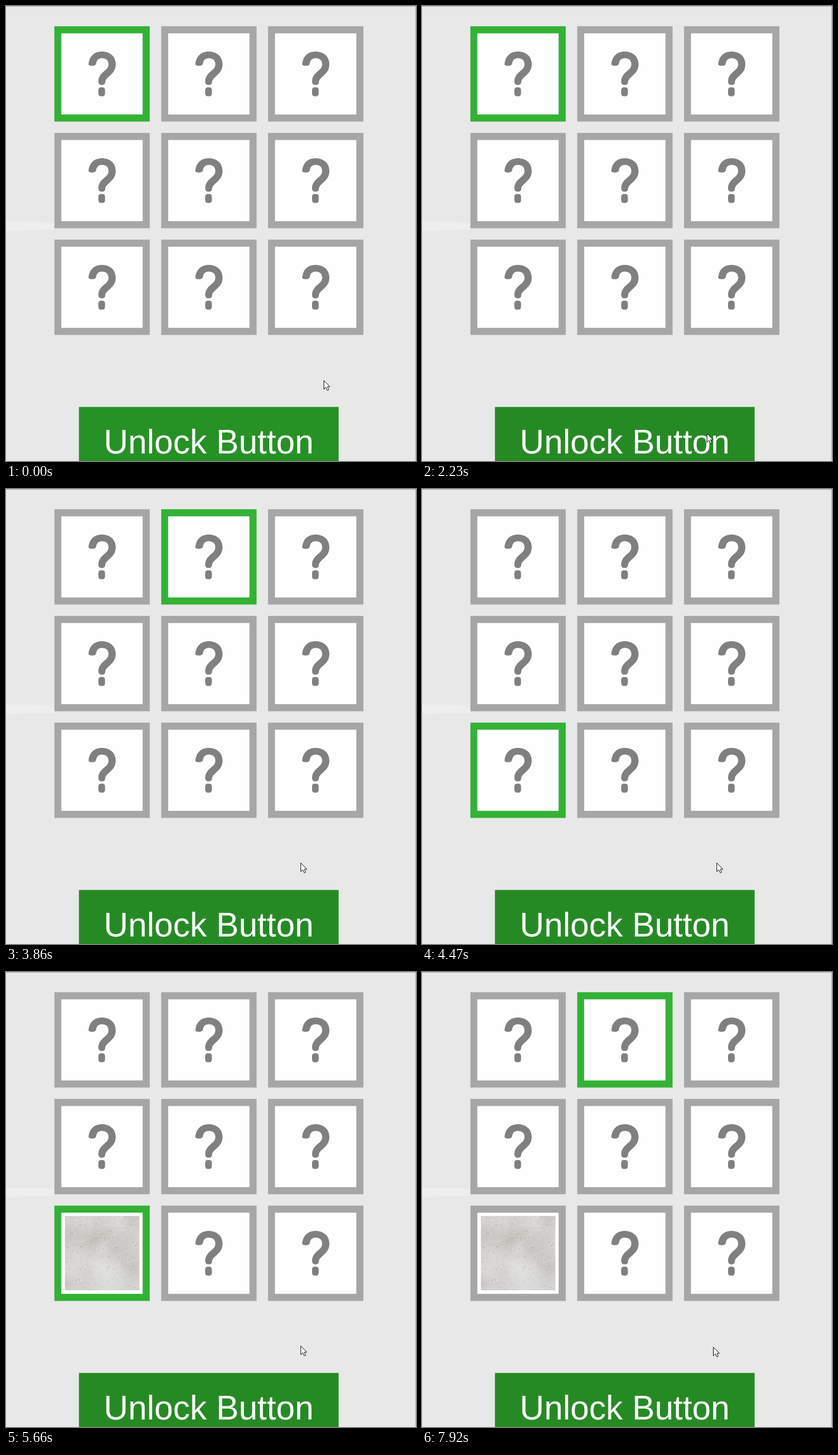
These frames come from a looping animation (710 px wide and 789 px high, 8 s). An HTML page with a canvas:

```html
<!DOCTYPE html>
<html lang="en">
<head>
<meta charset="utf-8">
<title>Unlock grid</title>
<style>
  html, body { margin: 0; height: 100%; overflow: hidden; background: #e8e8e8; }
  canvas { display: block; }
</style>
</head>
<body>
<canvas id="stage" width="710" height="789"></canvas>
<script>
const LOOP = 8000, REVEAL = 5660, PRIZE = 6, PITCH = 185, TICK = 196;
const ctx = document.getElementById('stage').getContext('2d');

// Each spin lights one cell per tick, in the order of its digits.
const spins = [
  { start: 2667, cells: '467310151658326' },
  { start: 7125, cells: '54101' }
];
const clicks = [2620, 7040];

// Pointer moves: start, end, x, y
const moves = [
  [210, 530, 546, 651], [780, 1000, 535, 662], [1600, 2230, 493, 741],
  [2740, 3080, 510, 648], [6320, 6670, 485, 740], [7160, 7500, 504, 650]
];

const hook = new Path2D('M143 101C144 88 152 79 166 79C181 79 190 88.5 190 101C190 112 184 117 178 122.5C173 127 172 129 171.7 133Q171 137 166 137Q160 137 160 131C160 124 163 119 170 113C175 109 177.5 106 177.5 101C177.5 94 173 90.5 166 90.5C160 90.5 157 94 156 100Q155 104 149 103.8Q143 103.6 143 101Z');
const dot = new Path2D();
dot.roundRect(160, 141, 11.5, 15.5, 4.5);
const arrow = new Path2D('M.5 .5V15.5L4 12.2L6.5 17.6L9 16.5L6.6 11.2H11Z');

const clamp = v => Math.min(1, Math.max(0, v));
const ease = v => v * v * (3 - 2 * v);

function rect(color, x, y, w, h) {
  ctx.fillStyle = color;
  ctx.fillRect(x, y, w, h);
}

function makeStone(size) {
  const stone = document.createElement('canvas');
  stone.width = stone.height = size;
  const c = stone.getContext('2d');
  let seed = 7;
  const random = (low, high) => low + (high - low) * (seed = seed * 16807 % 2147483647) / 2147483647;

  c.fillStyle = '#d6d5d2';
  c.fillRect(0, 0, size, size);
  for (let i = 0; i < 18; i++) {
    const x = random(0, size), y = random(0, size);
    const rgb = i % 2 ? '228,228,225' : '188,183,179';
    const cloud = c.createRadialGradient(x, y, 0, x, y, random(12, 42));
    cloud.addColorStop(0, `rgba(${rgb},.5)`);
    cloud.addColorStop(1, `rgba(${rgb},0)`);
    c.fillStyle = cloud;
    c.fillRect(0, 0, size, size);
  }
  c.strokeStyle = 'rgba(234,234,232,.5)';
  for (let i = 0; i < 6; i++) {
    const x = random(-20, size), y = random(0, size);
    c.beginPath();
    c.moveTo(x, y);
    c.quadraticCurveTo(x + 35, y - 10, x + 60, y - random(25, 50));
    c.stroke();
  }
  for (let i = 0; i < 1800; i++) {
    c.fillStyle = i % 30 ? i % 2 ? 'rgba(120,118,115,.15)' : 'rgba(245,245,243,.25)' : 'rgba(85,83,80,.5)';
    c.fillRect(random(0, size), random(0, size), 1.2, 1.2);
  }
  return stone;
}
const stone = makeStone(130);

function selectedAt(t) {
  let cell = 0;
  for (const { start, cells } of spins) {
    const tick = Math.floor((t - start) / TICK);
    if (tick >= 0) cell = +cells[Math.min(tick, cells.length - 1)];
  }
  return cell;
}

function drawBackground() {
  rect('#e8e8e8', 0, 0, 710, 789);
  ctx.fillStyle = '#edeeed';
  ctx.fill(new Path2D('M0 374H52L84 377V388L0 390Z'));
  rect('#a0a0a0', 0, 0, 710, 1);
  rect('#a8a8a8', 709, 0, 1, 789);
}

function drawCell(index, selected, revealed) {
  ctx.save();
  ctx.translate(index % 3 * PITCH, Math.floor(index / 3) * PITCH);
  rect(selected ? '#33b235' : '#a6a6a6', 83.8, 35.1, 165.1, 165.3);
  rect('#fefefe', 95.8, 47.4, 140.8, 140.7);
  if (revealed) {
    ctx.drawImage(stone, 102, 52.7, 129, 129);
  } else {
    ctx.fillStyle = '#808080';
    ctx.fill(hook);
    ctx.fill(dot);
  }
  ctx.restore();
}

function drawButton(t) {
  const hover = clamp((t - 1880) / 100);
  rect(`rgb(38,${Math.round(145 - 7 * hover)},36)`, 126.3, 695.3, 449.7, 94);
  ctx.fillStyle = '#fff';
  ctx.font = '58.4px "Liberation Sans", Arial, sans-serif';
  ctx.textAlign = 'center';
  ctx.fillText('Unlock Button', 351, 775.5);
}

function drawRing(x, y, radius, color) {
  ctx.strokeStyle = color;
  ctx.beginPath();
  ctx.arc(x, y, radius, 0, 2 * Math.PI);
  ctx.stroke();
}

function drawPointer(t) {
  let x = 550, y = 649;
  for (const [start, end, toX, toY] of moves) {
    const k = ease(clamp((t - start) / (end - start)));
    x += (toX - x) * k;
    y += (toY - y) * k;
  }
  ctx.lineWidth = 1;
  if (clicks.some(start => t >= start && t < start + 120)) {
    drawRing(x + 1.5, y + 1.5, 9.3, '#222');
    drawRing(x + 1.5, y + 1.5, 8.3, 'rgba(255,255,255,.5)');
  }
  ctx.save();
  ctx.translate(Math.round(x), Math.round(y));
  ctx.fillStyle = '#fff';
  ctx.strokeStyle = '#111';
  ctx.fill(arrow);
  ctx.stroke(arrow);
  ctx.restore();
}

function draw() {
  const t = performance.now() % LOOP;
  const selected = selectedAt(t);
  drawBackground();
  for (let i = 0; i < 9; i++) drawCell(i, i === selected, i === PRIZE && t >= REVEAL);
  drawButton(t);
  drawPointer(t);
  requestAnimationFrame(draw);
}
draw();
</script>
</body>
</html>
```
